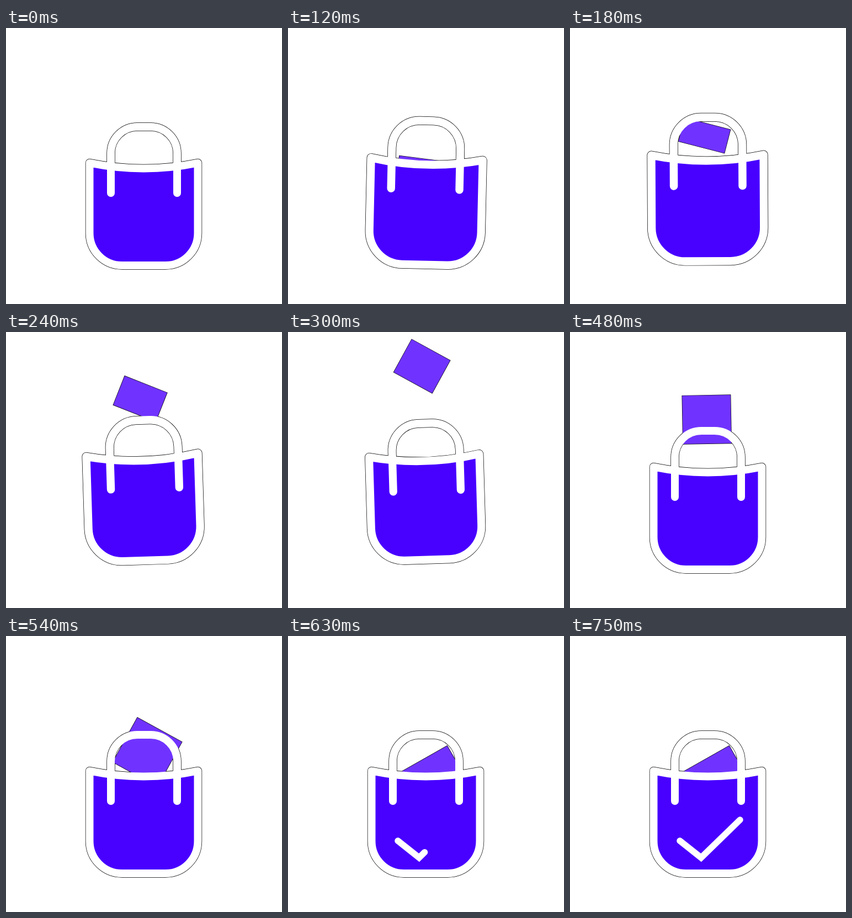
An HTML page with a canvas that plays this animation: 500x500 px, repeating every 1380 ms.

```html
<!DOCTYPE html>
<html lang="en">
<head>
<meta charset="utf-8">
<title>Bag</title>
<style>
  html, body { margin: 0; width: 100%; height: 100%; overflow: hidden; background: #fff; }
  canvas { display: block; width: 500px; height: 500px; }
</style>
</head>
<body>
<canvas id="stage" width="500" height="500"></canvas>
<script>
const ctx = document.getElementById('stage').getContext('2d');
const LOOP = 1380, STEP = 30, END = 750;
const HOP = 360, PEAK = 315, LAND = 630, CHECK = 540;
const BLUE = '#4800ff', VIOLET = '#7033ff', WHITE = '#fff', BLACK = '#000';
const LINE = 14, EDGE = 1.4;

const body = new Path2D('M151.5 244.5Q249.5 264.5 347.5 244.5V371.5A58.5 58.5 0 0 1 289 430H210A58.5 58.5 0 0 1 151.5 371.5Z');
const handle = new Path2D('M190 299V227A48 48 0 0 1 238 179H262A48 48 0 0 1 310 227V299');
const check = new Path2D('M199 371L237.5 401.5L308 333');
const CHECK_LENGTH = Math.hypot(38.5, 30.5) + Math.hypot(70.5, 68.5);

const clamp = v => Math.max(0, Math.min(1, v));
const lerp = (a, b, u) => a + (b - a) * u;
const ease = (u, a, b) => 1 - (1 - u ** a) ** b;

// Run draw in a space turned and scaled around (x, y), moved by dy
function around(x, y, dy, deg, scale, draw) {
  ctx.save();
  ctx.translate(x, y + dy);
  ctx.rotate(deg * Math.PI / 180);
  ctx.scale(scale, scale);
  ctx.translate(-x, -y);
  draw();
  ctx.restore();
}

function stroke(path, color, width) {
  ctx.strokeStyle = color;
  ctx.lineWidth = width;
  ctx.stroke(path);
}

// The body leaves the ground later than the handle
function bagParts(t) {
  const p = clamp(t / HOP), wave = Math.sin(Math.PI * p);
  const deg = 1.79 * Math.sin(2 * Math.PI * p) - 0.29 * wave;
  const scale = 1 + 0.037 * wave;
  const lift = (height, delay) => -height * Math.sin(Math.PI * p ** delay);
  return {
    body: draw => around(249.5, 337, lift(20.9, 2.5), deg, scale, draw),
    handle: draw => around(250, 239, lift(17.5, 1.6), deg, scale, draw)
  };
}

// Thrown up to the peak, then tumbling back down
function cardPose(t) {
  const grow = Math.min(1, t / 352);
  if (t < PEAK) {
    const u = t / PEAK, w = lerp(95.5, 78.5, u);
    return { x: lerp(245, 242.5, u), y: lerp(290, 57.5, ease(u, 2.45, 1.8)), w, h: w * grow, deg: lerp(-7, 30.5, u) };
  }
  const f = ease(clamp((t - PEAK) / (LAND - PEAK)), 1.6, 1.52), w = lerp(78.5, 97, f);
  return { x: lerp(242.5, 270, f ** 2.3), y: lerp(57.5, 265, f), w, h: w * grow, deg: lerp(30.5, 150.5, f) };
}

function drawCard({ x, y, w, h, deg }) {
  ctx.save();
  ctx.translate(x, y);
  ctx.rotate(deg * Math.PI / 180);
  ctx.fillStyle = BLACK;
  ctx.fillRect(-(w + EDGE) / 2, -(h + EDGE) / 2, w + EDGE, h + EDGE);
  ctx.fillStyle = VIOLET;
  ctx.fillRect(-w / 2, -h / 2, w, h);
  ctx.restore();
}

function drawCheck(p) {
  if (p <= 0) return;
  ctx.save();
  ctx.lineJoin = 'miter';
  if (p < 1) {
    // Start beyond the end so only the leading part shows
    ctx.setLineDash([CHECK_LENGTH * p, CHECK_LENGTH * 2]);
  }
  stroke(check, WHITE, 11.5);
  ctx.restore();
}

function render(t) {
  const bag = bagParts(t);
  ctx.fillStyle = WHITE;
  ctx.fillRect(0, 0, 500, 500);
  ctx.lineCap = ctx.lineJoin = 'round';

  bag.body(() => stroke(body, BLACK, LINE + EDGE));
  bag.handle(() => stroke(handle, BLACK, LINE + EDGE));
  drawCard(cardPose(t));
  bag.body(() => {
    ctx.fillStyle = BLUE;
    ctx.fill(body);
    stroke(body, WHITE, LINE);
  });
  bag.handle(() => stroke(handle, WHITE, LINE));
  drawCheck((t - CHECK) / (END - CHECK));
}

const start = performance.now();
function tick() {
  const t = (performance.now() - start) % LOOP;
  render(Math.min(END, Math.floor(t / STEP) * STEP));
  requestAnimationFrame(tick);
}
tick();
</script>
</body>
</html>
```
